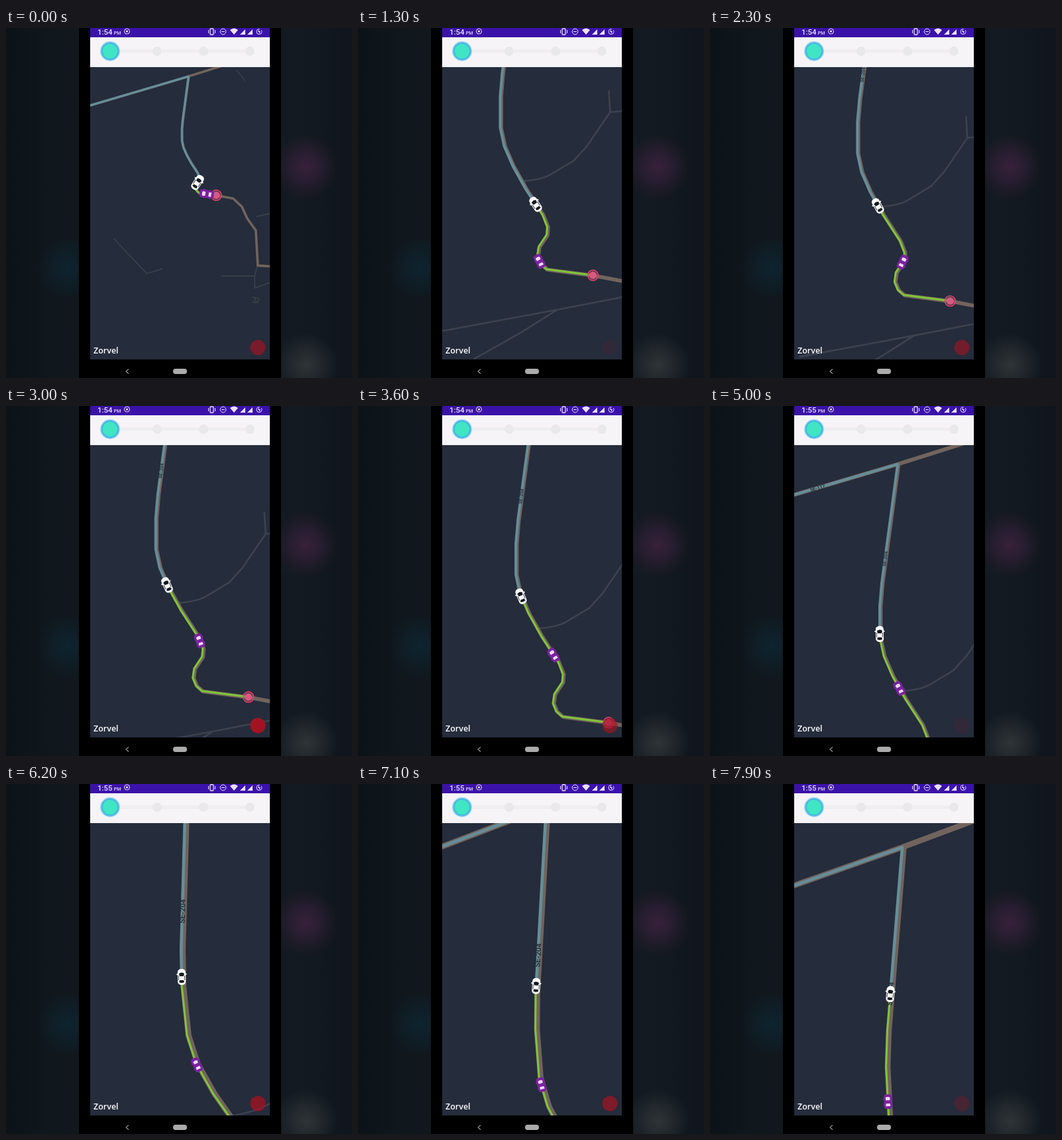
Write an HTML page that moves like this. It is 522 px wide and 528 px high and loops after 8 s.

```html
<!DOCTYPE html>
<html lang="en">
<head>
<meta charset="utf-8">
<title>Live trip map</title>
<style>
  html, body { margin: 0; width: 100%; height: 100%; overflow: hidden; background: #0c1317; }
  svg { display: block; width: 522px; height: 528px; }
  text { font-family: Roboto, "Open Sans", sans-serif; }
  .line { fill: none; stroke-linejoin: round; stroke-linecap: round; }
  #world .line { vector-effect: non-scaling-stroke; }
</style>
</head>
<body>
<svg viewBox="0 0 522 528">
  <defs>
    <clipPath id="mapClip"><rect x="127" y="59" width="271" height="441"/></clipPath>
    <linearGradient id="backdrop">
      <stop offset="0" stop-color="#0b1218"/><stop offset=".14" stop-color="#10181e"/>
      <stop offset=".85" stop-color="#131a21"/><stop offset="1" stop-color="#0e151c"/>
    </linearGradient>
    <radialGradient id="violet"><stop stop-color="#37213b"/><stop offset=".45" stop-color="#2f1f35" stop-opacity=".75"/><stop offset="1" stop-color="#251a2b" stop-opacity="0"/></radialGradient>
    <radialGradient id="teal"><stop stop-color="#0e242f"/><stop offset="1" stop-color="#0e242f" stop-opacity="0"/></radialGradient>
    <radialGradient id="grey"><stop stop-color="#2f3437"/><stop offset="1" stop-color="#2f3437" stop-opacity="0"/></radialGradient>
  </defs>

  <rect width="522" height="528" fill="url(#backdrop)"/>
  <circle cx="452" cy="209" r="52" fill="url(#violet)"/>
  <circle cx="93" cy="362" r="46" fill="url(#teal)"/>
  <circle cx="453" cy="508" r="48" fill="url(#grey)"/>
  <rect x="110" width="305" height="528" fill="#000"/>

  <g clip-path="url(#mapClip)">
    <rect x="127" y="59" width="271" height="441" fill="#252c3b"/>
    <g id="world">
      <g id="nearLanes" stroke="#3c424e" stroke-width="2.6">
        <path class="line" d="M262 293Q290 291 304 283L339 262 359 240 394 189 412 187M392 157L394 189"/>
        <path class="line" d="M141 519L314 487 412 468M314 487L260 521 189 561"/>
      </g>
      <g id="farLanes" stroke="#38424b" stroke-width="1.6">
        <path class="line" d="M-48 613L85 754 147 735M390 764H525L536 721M525 764V813L587 791M452 -73L485 -33M533 521L587 510"/>
        <path class="line" d="M517 851L542 855 538 872 517 870M524 852L532 871"/>
      </g>
      <g id="roads" stroke="#71645e">
        <path class="line" d="M-345 128L255 -49 655 -175"/>
        <path class="line" id="mainRoad"/>
      </g>
      <path class="line" id="ahead" stroke="#639aaa" stroke-opacity=".78"/>
      <path class="line" id="driven" stroke="#82c43a" stroke-width="3"/>
      <g id="labels" font-size="7" font-weight="700" fill="#27323a" text-anchor="middle">
        <text transform="translate(238.500 94) rotate(-82)">SE-204</text>
        <text transform="translate(135 -11) rotate(-16.500)">SE-117</text>
      </g>
    </g>
    <g id="goal">
      <circle r="8" fill="#c43e63" fill-opacity=".45" stroke="#e0446b" stroke-width="1.4"/>
      <circle r="5.500" fill="#d65a80"/>
    </g>
    <g id="follower">
      <rect x="-6" y="-11" width="12" height="22" rx="4" fill="#7b239f"/>
      <path d="M-7 -4H7M-7 5H7" stroke="#7b239f" stroke-width="2"/>
      <path d="M-3.500 -6Q0 -8 3.500 -6L3 -2H-3ZM-3 3H3L3.500 7H-3.500Z" fill="#f1dcf6"/>
    </g>
    <g id="leader">
      <rect x="-6" y="-12" width="12" height="24" rx="5" fill="#fff"/>
      <path d="M-7.500 -4H7.500" stroke="#fff" stroke-width="2"/>
      <path d="M-4 -5Q0 -8 4 -5L3 -1H-3ZM-3 5H3L4 8Q0 10 -4 8Z" fill="#111820"/>
      <path d="M-4.500 -2V5M4.500 -2V5" stroke="#384048"/>
    </g>
    <circle id="record" cx="380" cy="482" r="11.500" fill="#a21322"/>
    <text x="132" y="491" font-size="12.500" fill="#fff" style="font-family:'Open Sans',sans-serif;font-weight:600">Zorvel</text>
  </g>

  <rect x="127" width="271" height="14" fill="#3b12a9"/>
  <g fill="#e9e4f6">
    <text x="138" y="9.500" font-size="11.500" font-weight="500"><tspan id="clock">1:54</tspan><tspan font-size="7" dx="2">PM</tspan></text>
    <g stroke="#e9e4f6" fill="none">
      <circle cx="182.500" cy="5" r="4"/>
      <rect x="308" y="1" width="5" height="9" rx="1" stroke-width="1.300"/>
      <path d="M305.500 3V8M315.500 3V8M325 5.500H330"/>
      <circle cx="327.500" cy="5.500" r="4.300"/>
      <circle cx="382" cy="5.500" r="4" stroke-dasharray="19 3"/>
    </g>
    <circle cx="182.500" cy="5" r="1.600"/>
    <path d="M338 3Q344 -2 350 3L344 10ZM353 10L361 2V10ZM364 10L372 2V10Z"/>
    <path d="M382 2L380 6H382V9L384 5H382Z"/>
  </g>
  <rect x="127" y="14" width="271" height="45" fill="#f6f4f7"/>
  <path d="M165 35H368" stroke="#eeedf0" stroke-width="5"/>
  <g fill="#e9e8eb"><circle cx="228" cy="35" r="7"/><circle cx="298" cy="35" r="7"/><circle cx="368" cy="35" r="7"/></g>
  <circle cx="157" cy="35" r="15" fill="#9cd5f3"/>
  <circle cx="157" cy="35" r="13.500" fill="#48b9e6"/>
  <circle cx="157" cy="35" r="11" fill="#40e6c3"/>
  <path class="line" d="M184.500 515L181 518 184.500 521" stroke="#8f8f8f" stroke-width="1.400"/>
  <rect x="252" y="514" width="21" height="8" rx="4" fill="#ababab"/>
</svg>

<script>
const LOOP = 8000;
const $ = id => document.getElementById(id);

// Route in map units, from the junction to the goal; y always grows.
const route = [[255, -49], [231, 130], [228, 165], [228, 212], [234, 240], [247, 270], [266, 304], [292, 344],
  [299, 362], [298, 374], [286, 392], [284, 406], [289, 418], [298, 426], [368, 435]];
const beyond = [[436, 448], [471, 481], [493, 529], [528, 578], [536, 721], [587, 724]];
const goal = route[route.length - 1];

// time, leader screen x, y, zoom, turn, leader route y, follower route y
const keys = [
  [0, 289, 233, .37, 0, 383, 430],
  [1300, 268, 266, 1, 0, 328, 414],
  [3000, 243, 270, 1, 0, 266, 350],
  [4200, 249, 304, 1, 0, 223, 316],
  [5000, 256, 344, 1, 0, 207, 289],
  [6200, 265, 291, 1.58, -6, 156, 241],
  [7900, 272, 317, 1.54, -3, 94, 199]
];

const mix = (a, b, k) => a + (b - a) * k;
const clamp = (v, lo = 0, hi = 1) => Math.min(hi, Math.max(lo, v));
const toPath = points => "M" + points.map(p => p.join(" ")).join("L");

function stateAt(time) {
  let i = 0;
  while (i < keys.length - 2 && time > keys[i + 1][0]) i++;
  const a = keys[i], b = keys[i + 1];
  const k = clamp((time - a[0]) / (b[0] - a[0]));
  const values = a.map((v, n) => mix(v, b[n], k));
  values[3] = a[3] * (b[3] / a[3]) ** k;
  return values;
}

function routeX(y) {
  if (y <= route[0][1]) return route[0][0];
  for (let i = 1; i < route.length; i++) {
    const [x0, y0] = route[i - 1], [x1, y1] = route[i];
    if (y <= y1) return mix(x0, x1, (y - y0) / (y1 - y0));
  }
  return goal[0];
}

const heading = y => Math.atan2(routeX(y - 6) - routeX(y + 6), 12) * 180 / Math.PI;

$("mainRoad").setAttribute("d", toPath([...route, ...beyond].map(([x, y]) => [x + 1.5, y + .5])));

function draw(time) {
  const [, sx, sy, zoom, turn, leadY, followY] = stateAt(time);
  const lead = [routeX(leadY), leadY];
  const cos = Math.cos(turn * Math.PI / 180), sin = Math.sin(turn * Math.PI / 180);
  const place = (id, x, y, angle) => {
    const dx = (x - lead[0]) * zoom, dy = (y - lead[1]) * zoom;
    $(id).setAttribute("transform",
      `translate(${sx + dx * cos - dy * sin} ${sy + dx * sin + dy * cos}) rotate(${angle})`);
  };

  $("world").setAttribute("transform",
    `translate(${sx} ${sy}) rotate(${turn}) scale(${zoom}) translate(${-lead[0]} ${-lead[1]})`);
  place("leader", ...lead, heading(leadY) + turn);
  place("follower", routeX(followY), followY, heading(followY) + turn);
  place("goal", ...goal, 0);

  const front = route.filter(p => p[1] < leadY), back = route.filter(p => p[1] > leadY);
  $("ahead").setAttribute("d", toPath([[-345, 128], ...front, lead]));
  $("driven").setAttribute("d", toPath([lead, ...back]));
  $("roads").setAttribute("stroke-width", Math.max(3.6, 5.8 * zoom ** .9));
  $("ahead").setAttribute("stroke-width", 3 + zoom);

  const near = clamp((zoom - .5) / .4);
  $("nearLanes").setAttribute("opacity", near);
  $("labels").setAttribute("opacity", near);
  $("farLanes").setAttribute("opacity", 1 - near);

  // The record light swells and fades as a triangle wave peaking at 3 s.
  const phase = Math.abs(time - 3000) / 3600 % 1;
  $("record").setAttribute("opacity", Math.max(.1, Math.abs(1 - 2 * phase)));
  $("clock").textContent = time < 3900 ? "1:54" : "1:55";
}

const start = performance.now();
function tick() {
  draw((performance.now() - start) % LOOP);
  requestAnimationFrame(tick);
}
tick();
</script>
</body>
</html>
```
